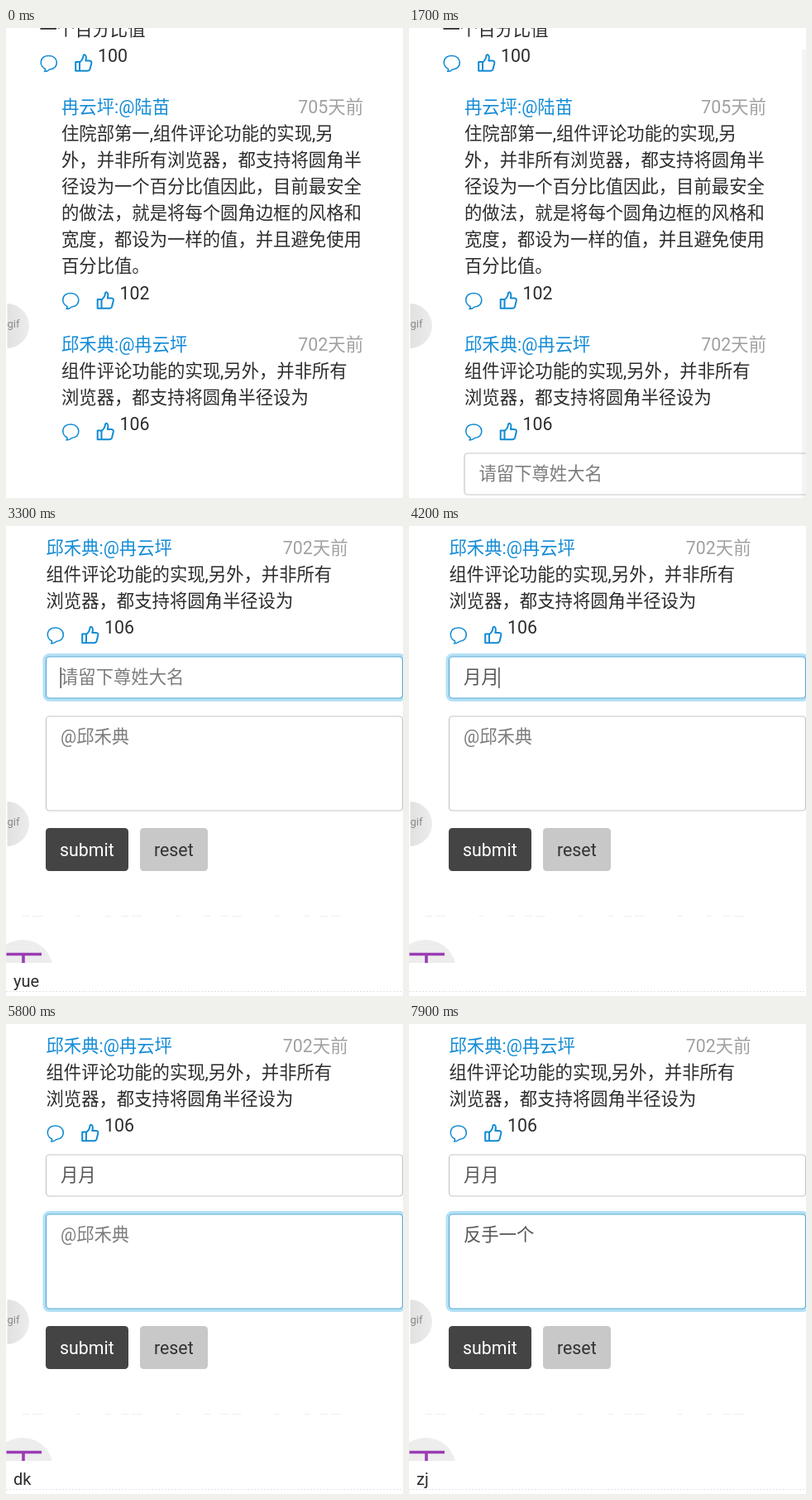
An HTML page for the animation above (8 s loop, 480 by 568 pixels).

```html
<!DOCTYPE html>
<html lang="zh-CN">
<head>
<meta charset="utf-8">
<title>Comment form</title>
<style>
  html, body { margin: 0; width: 100%; height: 100%; overflow: hidden; background: #fff; }
  svg { display: block; width: 480px; height: 568px; }
  text { font: 21.35px Roboto, "Noto Sans CJK SC", "Noto Sans CJK", sans-serif; fill: #2c2c2c; white-space: pre; }
  .name { fill: #128bd6; }
  .date { fill: #a0a0a0; text-anchor: end; }
  .hint { fill: #7c7c7c; }
  .typed { fill: #555; }
  .icon { fill: none; stroke: #118bd2; stroke-width: 1.6; stroke-linejoin: round; }
  .thumb { stroke-width: 2; }
  .box { fill: #fff; stroke: #c6c6c6; stroke-width: 1.2; }
  .glow { fill: none; stroke: #b4e1f6; stroke-width: 4; }
  .focus .box { stroke: #5aaad8; }
  .caret { fill: #444; }
</style>
</head>
<body>
<svg id="stage" viewBox="0 0 480 568"></svg>
<script>
const LOOP = 8000;
const ANN = "冉云坪", BEN = "邱禾典", CAT = "陆苗", TYPED = "月月";

// y is the visual middle of the line
const text = (x, y, s, cls = "", extra = "") =>
  `<text x="${x}" y="${y + 7}" class="${cls}" ${extra}>${s}</text>`;

const actions = (x, y, count) => `
  <g class="icon" transform="translate(${x} ${y})">
    <path d="M-4.500 7C-12.500 3-11.500-9 0-9C12-9 12.500 7 1 7.500Q-1.500 10-5.500 10Q-4 8.800-4.500 7Z"/>
    <path class="thumb" transform="translate(42 0)"
      d="M-9.800-1.500h4.800v10.800h-4.800zM-5-1Q-.8-4.500-.6-8.500Q-.2-10.800 1.500-10Q3.800-8.500 2.300-3H7Q9.800-2.800 9.300 0L7.600 7Q6.900 9.300 4.500 9.300H-5"/>
  </g>` + text(x + 59, y - 8.6, count);

const comment = (y, who, to, days, lines) =>
  text(67, y, `${who}:@${to}`, "name") +
  text(432, y, `${days}天前`, "date") +
  lines.map((s, i) => text(67, y + 31.9 + i * 32, s)).join("");

const field = (id, y, h, hint) => `
  <g id="${id}">
    <rect class="glow" x="65" y="${y - 2}" width="435" height="${h + 4}" rx="6"/>
    <rect class="box" x="67" y="${y}" width="431" height="${h}" rx="4"/>
    ${text(84.5, y + 25, hint, "hint")}
    <rect class="caret" y="${y + 13}" width="1.4" height="25"/>
  </g>`;

const button = (x, w, label, fill, ink) => `
  <rect x="${x}" y="721" width="${w}" height="52" rx="4.500" fill="${fill}"/>
  ${text(x + 17, 747.5, label, "", `style="fill:${ink}"`)}`;

document.getElementById("stage").innerHTML = `
  <defs>
    <linearGradient id="shade"><stop stop-color="#d6d6d6"/><stop offset="1" stop-color="#ececec"/></linearGradient>
    <clipPath id="edge"><path d="M1.500 0H480V568H1.500Z"/></clipPath>
  </defs>
  <g id="page">
    ${text(40.5, 2, "一个百分比值")}
    ${actions(52, 42.5, 100)}
    ${comment(96.2, ANN, CAT, 705, [
      "住院部第一,组件评论功能的实现,另",
      "外，并非所有浏览器，都支持将圆角半",
      "径设为一个百分比值因此，目前最安全",
      "的做法，就是将每个圆角边框的风格和",
      "宽度，都设为一样的值，并且避免使用",
      "百分比值。"])}
    ${actions(78.5, 329.5, 102)}
    ${comment(383.2, BEN, ANN, 702, [
      "组件评论功能的实现,另外，并非所有",
      "浏览器，都支持将圆角半径设为"])}
    ${actions(78.5, 488, 106)}
    <g id="form">
      ${field("nick", 514, 50, "请留下尊姓大名")}
      ${field("note", 586, 114, "@" + BEN)}
      ${button(66.5, 100, "submit", "#444", "#fff")}
      ${button(180.5, 82, "reset", "#c8c8c8", "#333")}
      <path d="M38 827.500H430" stroke="#efefef" stroke-dasharray="9 4 12 40 6 29 8 12"/>
      <circle cx="38.500" cy="893" r="37" fill="#ededed"/>
      <path d="M19 873.500H61.500M39.500 874V890" stroke="#9a3cb5" stroke-width="3.600"/>
    </g>
  </g>
  <circle id="tap" cx="84" cy="486" r="15.500" fill="#fff" fill-opacity=".25" stroke="#cfcfcf"/>
  <rect id="bar" x="475" y="26" width="5" height="542" fill="#b9b9b9"/>
  <g id="keys">
    <path d="M0 528H480V568H0Z" fill="#fff"/>
    <path id="rule" d="M0 562.500H480" stroke="#e2e2e2" stroke-dasharray="2 2"/>
    <text id="pinyin" x="9" y="557" style="font-size:20px"></text>
  </g>
  <g clip-path="url(#edge)">
    <circle cx="1" cy="360" r="27" fill="url(#shade)"/>
    <text x="1.500" y="362" style="font-size:13px;fill:#8a8a8a">gif</text>
  </g>`;

const pinyinSteps = [
  [0, ""], [2900, "y"], [3100, "yu"], [3300, "yue"], [3550, "yue'yue"], [3750, ""],
  [5550, "d"], [5750, "dk"], [6000, "d"], [6150, "f"], [6300, "fan"], [6500, "fan'shou"],
  [6680, ""], [6880, "yi"], [7050, "yi'ge"], [7350, ""], [7600, "z"], [7760, "zj"]
];
const nickSteps = [[0, ""], [3750, TYPED]];
const noteSteps = [[0, ""], [6680, "反手"], [7350, "反手一个"]];
const caretStarts = [0, 2100, 3750, 4850, 6680, 7350].map(t => [t, t]);

const at = (steps, t) => steps.findLast(s => s[0] <= t)[1];
const $ = id => document.getElementById(id);
const show = (el, on) => { el.style.display = on ? "" : "none"; };

function paintField(id, hint, value, focused, blink) {
  const el = $(id), label = el.querySelector("text"), caret = el.querySelector(".caret");
  el.setAttribute("class", focused ? "focus" : "");
  label.textContent = value || hint;
  label.setAttribute("class", value ? "typed" : "hint");
  caret.setAttribute("x", 84 + value.length * 21.35);
  show(el.querySelector(".glow"), focused);
  show(caret, focused && blink);
}

function paint(t) {
  const scrolled = t >= 2600;
  const blink = (t - at(caretStarts, t)) % 1000 < 500;
  $("page").setAttribute("transform", scrolled ? "translate(-18.500 -356)" : "");
  show($("form"), t >= 960);
  show($("tap"), t >= 780 && t < 1250);
  show($("bar"), t >= 960 && t < 1750);
  $("bar").setAttribute("opacity", Math.min(1, Math.max(0, (1750 - t) / 300)));
  show($("keys"), t >= 2350);
  show($("rule"), scrolled);
  $("pinyin").textContent = at(pinyinSteps, t);
  paintField("nick", "请留下尊姓大名", at(nickSteps, t), t >= 2100 && t < 4850, blink);
  paintField("note", "@" + BEN, at(noteSteps, t), t >= 4850, blink);
}

function tick() {
  paint(performance.now() % LOOP);
  requestAnimationFrame(tick);
}
tick();
</script>
</body>
</html>
```
